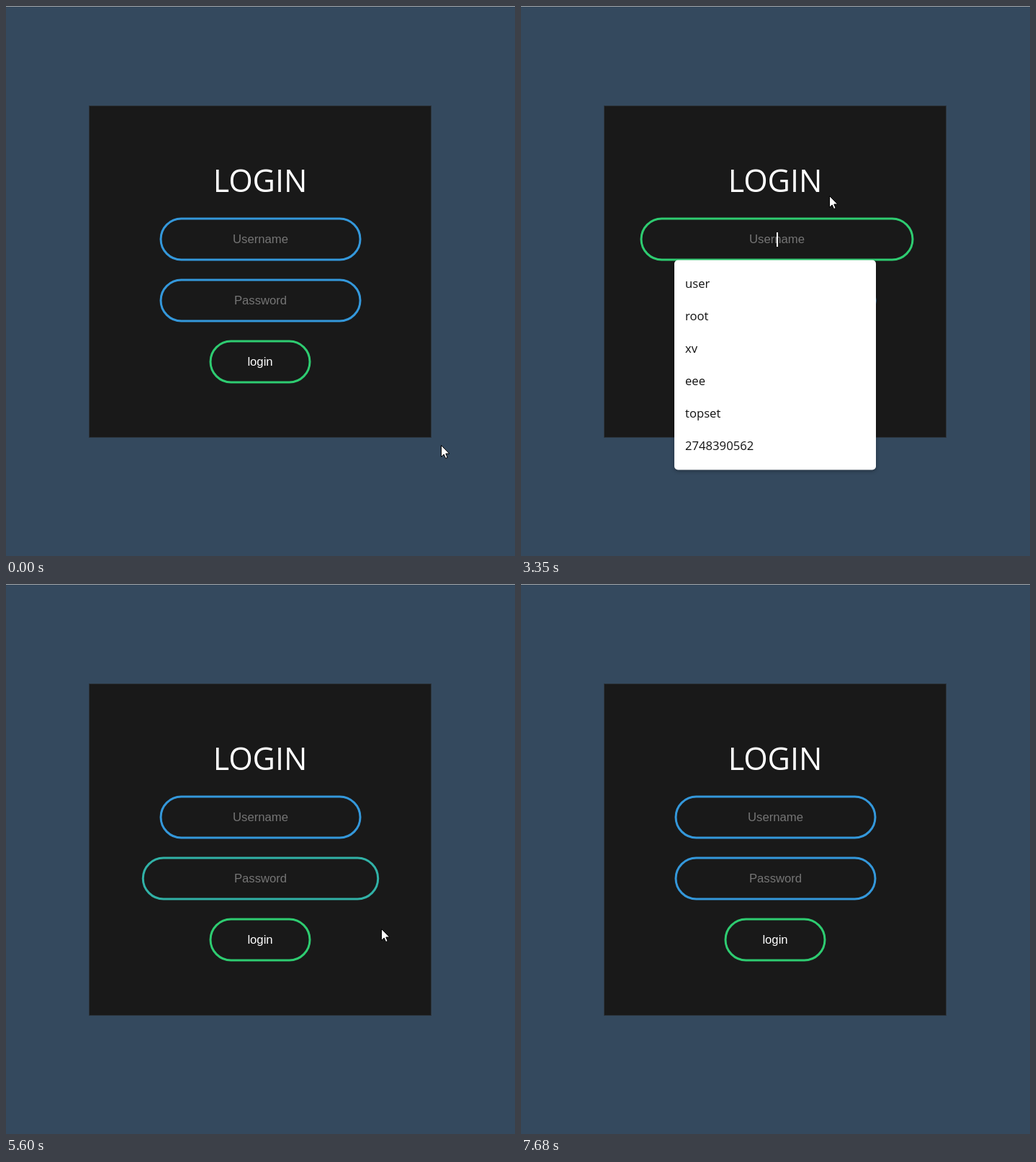
An HTML page with a canvas that plays this animation: 707 px wide and 763 px high, repeating every 8330 ms.

```html
<!DOCTYPE html>
<html lang="en">
<head>
<meta charset="utf-8">
<title>Login form</title>
<style>
  html, body { margin: 0; width: 100%; height: 100%; overflow: hidden; background: #34495e; }
  canvas { display: block; }
</style>
</head>
<body>
<canvas id="stage" width="707" height="763"></canvas>
<script>
const ctx = document.getElementById('stage').getContext('2d');
const LOOP = 8330;
const FADE = 250;
const BLINK = 515;
const BLUE = [52, 152, 219], GREEN = [46, 204, 113], DARK = [25, 25, 25];
const SANS = '16.67px "Liberation Sans", Arial, sans-serif';
const UI = '"Open Sans", "Noto Sans", sans-serif';

const fields = [
  { label: 'Username', y: 293.5, focus: 2000, blur: 3440, caret: 1935 },
  { label: 'Password', y: 378.5, focus: 4214, blur: 5527, caret: 4185 }
];
const button = { x: 282.5, y: 463.5, w: 141, h: 60, enter: 5985, leave: 6793 };
const popup = { open: 2060, close: 3440, items: ['user', 'root', 'xv', 'eee', 'topset', '2748390562'] };

// Pointer path: time, x, y
const path = [
  [0, 604, 609], [480, 604, 609], [850, 540, 470], [1330, 445, 317], [1440, 425.5, 317],
  [1670, 404, 318], [3150, 404, 318], [3335, 428, 263], [3470, 428, 263], [3980, 348, 421],
  [4030, 345.5, 423], [5150, 345.5, 423], [5500, 521, 478], [5620, 521, 478], [5985, 424, 491],
  [6150, 385, 491], [6690, 385, 491], [6793, 424, 497], [6840, 484, 501], [7000, 547, 501],
  [7450, 547, 501], [7680, 646, 764], [LOOP, 646, 764]
];

// CSS "ease" timing: cubic-bezier(.25, .1, .25, 1)
function ease(x) {
  if (x <= 0) return 0;
  if (x >= 1) return 1;
  const bez = (a, b, s) => 3 * a * s * (1 - s) ** 2 + 3 * b * s * s * (1 - s) + s ** 3;
  let lo = 0, hi = 1;
  for (let i = 0; i < 24; i++) {
    const mid = (lo + hi) / 2;
    if (bez(0.25, 0.25, mid) < x) lo = mid; else hi = mid;
  }
  return bez(0.1, 1, lo);
}

const toggle = (t, on, off) => ease((t - on) / FADE) - ease((t - off) / FADE);
const mix = (a, b, p) => `rgb(${a.map((v, i) => Math.round(v + (b[i] - v) * p))})`;

// Slope at a path point; zero where the pointer rests
function slope(i, axis) {
  const a = path[i - 1], b = path[i], c = path[i + 1];
  if (!a || !c) return 0;
  const still = (p, q) => p[1] === q[1] && p[2] === q[2];
  if (still(a, b) || still(b, c)) return 0;
  const before = b[axis] - a[axis], after = c[axis] - b[axis];
  if (before * after <= 0) return 0;
  const m = (before + after) / (c[0] - a[0]);
  const cap = 3 * Math.min(Math.abs(before / (b[0] - a[0])), Math.abs(after / (c[0] - b[0])));
  return Math.sign(m) * Math.min(Math.abs(m), cap);
}

function pointerAt(t) {
  let i = 0;
  while (i < path.length - 2 && t >= path[i + 1][0]) i++;
  const a = path[i], b = path[i + 1], d = b[0] - a[0], s = (t - a[0]) / d;
  return [1, 2].map(k =>
    a[k] * (1 + 2 * s) * (1 - s) ** 2 + b[k] * s * s * (3 - 2 * s) +
    d * (slope(i, k) * s * (1 - s) ** 2 - slope(i + 1, k) * s * s * (1 - s)));
}

function pill(box, stroke, fill) {
  ctx.beginPath();
  ctx.roundRect(box.x + 1.5, box.y + 1.5, box.w - 3, box.h - 3, (box.h - 3) / 2);
  if (fill) {
    ctx.fillStyle = fill;
    ctx.fill();
  }
  ctx.lineWidth = 3;
  ctx.strokeStyle = stroke;
  ctx.stroke();
}

function text(str, x, y, font, color, align = 'center') {
  ctx.font = font;
  ctx.fillStyle = color;
  ctx.textAlign = align;
  ctx.fillText(str, x, y);
}

function fieldBox(f, t) {
  const w = 280 + 100 * toggle(t, f.focus, f.blur);
  return { x: Math.max(165.5, 353.5 - w / 2), y: f.y, w, h: 60 };
}

function drawField(f, box, t) {
  const mid = box.x + box.w / 2;
  pill(box, mix(BLUE, GREEN, toggle(t, f.focus, f.blur)));
  text(f.label, mid, f.y + 35.5, SANS, '#757575');
  const lit = Math.floor((t - f.caret) / BLINK) % 2 === 0;
  if (t >= f.focus && t < f.blur && lit) {
    ctx.fillStyle = '#fff';
    ctx.fillRect(Math.round(mid - 0.5), f.y + 20.5, 2, 20);
  }
}

function drawPopup() {
  ctx.save();
  ctx.shadowColor = 'rgba(0,0,0,.3)';
  ctx.shadowBlur = 5;
  ctx.shadowOffsetY = 2;
  ctx.fillStyle = '#fff';
  ctx.beginPath();
  ctx.roundRect(213, 352.5, 280, 291, 5);
  ctx.fill();
  ctx.restore();
  popup.items.forEach((s, i) => text(s, 228, 391 + 45 * i, '16.67px ' + UI, '#111', 'left'));
}

function outline(points) {
  ctx.beginPath();
  points.forEach(([x, y]) => ctx.lineTo(x, y));
  ctx.closePath();
  ctx.lineJoin = 'round';
  ctx.lineWidth = 1;
  ctx.fillStyle = '#fff';
  ctx.strokeStyle = '#000';
  ctx.fill();
  ctx.stroke();
}

const cursors = {
  arrow() {
    outline([[0.5, 0.5], [0.5, 16.5], [4.2, 13], [6.6, 18.5], [9.2, 17.5], [6.8, 12], [11.8, 12]]);
  },
  beam() {
    ctx.fillStyle = '#e0e0e0';
    ctx.fillRect(0, -7, 1, 15);
    for (const y of [-8, 8]) {
      ctx.fillRect(-3, y, 3, 1);
      ctx.fillRect(1, y, 3, 1);
    }
  },
  hand() {
    outline([[-1, 0.5], [1, 0.5], [1.5, 6], [5, 6.5], [9.5, 8], [10.5, 10], [9.5, 15],
      [8, 19], [0, 19], [-5.5, 11.5], [-4.5, 10], [-1.5, 12]]);
  }
};

const inside = (b, x, y) => x >= b.x && x <= b.x + b.w && y >= b.y && y <= b.y + b.h;

function draw(t) {
  ctx.fillStyle = '#34495e';
  ctx.fillRect(0, 0, 707, 763);
  ctx.fillStyle = '#a3a6a9';
  ctx.fillRect(0, 0, 707, 1);
  ctx.fillStyle = '#2b333b';
  ctx.fillRect(115, 138, 476, 461);
  ctx.fillStyle = '#191919';
  ctx.fillRect(116, 139, 474, 459);

  text('LOGIN', 353, 257.5, '43px ' + UI, '#fff');
  const boxes = fields.map(f => fieldBox(f, t));
  fields.forEach((f, i) => drawField(f, boxes[i], t));
  pill(button, mix(GREEN, GREEN, 0), mix(DARK, GREEN, toggle(t, button.enter, button.leave)));
  text('login', 353, 499, SANS, '#fff');
  if (t >= popup.open && t < popup.close) drawPopup();

  const [x, y] = pointerAt(t);
  const kind = boxes.some(b => inside(b, x, y)) ? 'beam' : inside(button, x, y) ? 'hand' : 'arrow';
  ctx.save();
  ctx.translate(Math.round(x), Math.round(y));
  cursors[kind]();
  ctx.restore();
}

const start = performance.now();
function tick() {
  draw((performance.now() - start) % LOOP);
  requestAnimationFrame(tick);
}
tick();
</script>
</body>
</html>
```
